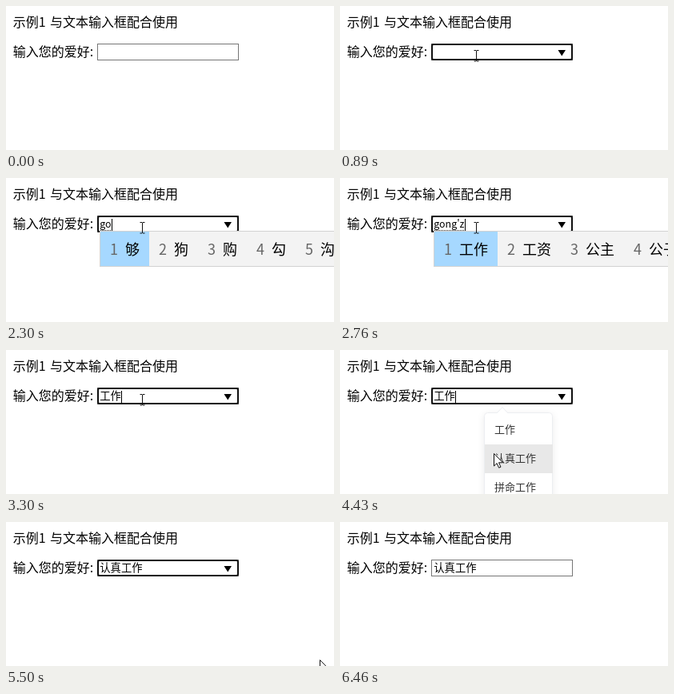
Animation of 410 by 180 pixels, one loop 6590 ms. Source, as an HTML page:

```html
<!DOCTYPE html>
<html lang="zh-CN">
<head>
<meta charset="utf-8">
<title>文本输入框</title>
<style>
  html, body { margin: 0; width: 100%; height: 100%; overflow: hidden; background: #fff; }
  svg { display: block; width: 410px; height: 180px; font: 16px "Noto Sans CJK SC", "Noto Sans CJK", sans-serif; }
  .small { font-size: 13.333px; }
  #menu { font-size: 13px; fill: #333; }
  #ime { font-size: 18px; }
  #ime .num { fill: #666; }
</style>
</head>
<body>
<svg viewBox="0 0 410 180">
  <text x="8.7" y="26">示例1</text>
  <text x="55" y="26">与文本输入框配合使用</text>
  <text x="8.7" y="63">输入您的爱好:</text>

  <rect id="border" x="114.5" y="47.5" width="176" height="20" fill="#fff" stroke="#767676"/>
  <rect id="ring" x="115" y="48" width="175" height="19" rx="2" fill="#fff" stroke="#101010" stroke-width="2"/>
  <path id="indicator" d="M272.5 55h9.5l-4.75 7.5z"/>
  <text id="value" class="small" x="117.3" y="62"></text>
  <path id="underline" fill="none" stroke="#333" stroke-dasharray="1 1"/>
  <rect id="caret" y="51" width="1" height="15"/>

  <g id="menu">
    <rect x="180.5" y="78.5" width="85" height="130" rx="4" fill="#fff" stroke="#eceef1"
      style="filter: drop-shadow(0 2px 4px rgba(0,0,0,.08))"/>
    <path d="M196 79l7-7.5 7 7.5" fill="#fff" stroke="#eceef1"/>
    <rect id="highlight" x="181" width="85" height="36" fill="#e8e8e8"/>
    <text x="193" y="103.5"></text>
    <text x="193" y="139.5"></text>
    <text x="193" y="175.5"></text>
  </g>

  <g id="ime">
    <rect x="117.5" y="66.5" width="300" height="44" fill="#f3f3f3" stroke="#d2d2d2"/>
    <rect id="chosen" x="118" y="67" height="43" fill="#a6d8ff"/>
    <g id="candidates"></g>
  </g>

  <path id="beam" d="M-3-7h2.5l.5.5.5-.5H3M0-6.5V6M-3 6.5h2.5L0 6l.5.5H3" fill="none" stroke="#111"/>
  <path id="arrow" d="M.5.5v15.5l3.6-3.4 2.5 5.6 2.4-1-2.5-5.4h5z" fill="#fff" stroke="#111"/>
</svg>
<script>
const LOOP = 6590;
const TEXT_LEFT = 117.3;
const $ = id => document.getElementById(id);
const show = (id, on) => $(id).setAttribute("visibility", on ? "visible" : "hidden");
const setText = (node, text) => { if (node.textContent !== text) node.textContent = text; };

// [start, text, input-method candidates]
const entries = [
  [0, ""],
  [2100, "g", "个 给 过 高 国"],
  [2300, "go", "够 狗 购 勾 沟"],
  [2500, "gon", "共 公 工 供 宫"],
  [2560, "gong", "工 公 共 供 宫"],
  [2760, "gong'z", "工作 工资 公主 公子"],
  [2890, "gong'zu", "工作 公租 公祖 公足"],
  [2950, "gong'zuo", "工作 公座 共做 工做"],
  [3300, "工作"],
  [4840, "认真工作"]
];
// [start, opacity]
const menuFade = [[0, 0], [960, .5], [1030, 1], [2170, .4], [2230, 0],
  [3370, 1], [4910, .6], [4970, .25], [5040, 0]];
// [start, caret visible]
const blinks = [[0, 0], [960, 1], [1500, 0], [2030, 1], [3830, 0], [4360, 1],
  [5330, 0], [5860, 1], [6390, 0]];
// [start, end, step, from, to, ease]
const moves = [
  [200, 760, 70, [334, 163], [170, 62], u => 1 - (1 - u) ** 2],
  [4230, 4430, 66.6, [172, 76], [192.5, 130], u => u],
  [4500, 4640, 70, [194, 131], [200, 136], u => u],
  [5240, 5500, 65, [212, 138], [392, 172], u => u]
];

const latest = (list, t) => list.findLast(item => item[0] <= t);

function pointer(t) {
  const move = latest(moves, t);
  if (!move || t >= 5570) return null;
  const [start, end, step, from, to, ease] = move;
  const elapsed = Math.floor((t - start) / step + .001) * step;
  const u = ease(Math.min(1, elapsed / (end - start)));
  return from.map((v, i) => v + (to[i] - v) * u);
}

let shownCandidates;
function drawCandidates(words) {
  show("ime", words);
  if (!words || words === shownCandidates) return;
  shownCandidates = words;
  const list = words.split(" ");
  const pitch = 43 + 18 * list[0].length;
  $("chosen").setAttribute("width", pitch);
  $("candidates").innerHTML = list.map((word, i) => {
    const x = 130 + i * pitch;
    return `<text class="num" x="${x}" y="95.5">${i + 1}</text><text x="${x + 19}" y="95.5">${word}</text>`;
  }).join("");
}

function draw(t) {
  const focused = t >= 890 && t < 6460;
  const at = pointer(t);
  const overInput = at && at[0] > 114 && at[0] < 291 && at[1] > 47 && at[1] < 68;
  show("ring", focused);
  show("indicator", focused || overInput);
  $("border").setAttribute("stroke", overInput ? "#4f4f4f" : "#767676");

  const [, text, words] = latest(entries, t);
  const value = $("value");
  setText(value, text);
  value.style.fontSize = words ? "12.4px" : "";
  const end = Math.ceil(TEXT_LEFT + (text ? value.getComputedTextLength() : 0));
  $("underline").setAttribute("d", words ? `M118 65.5H${end}` : "");
  $("caret").setAttribute("x", end);
  show("caret", latest(blinks, t)[1]);
  drawCandidates(words);

  $("menu").setAttribute("opacity", latest(menuFade, t)[1]);
  const items = t < 3000 ? ["抽烟", "喝酒", "烫头"] : ["工作", "认真工作", "拼命工作"];
  $("menu").querySelectorAll("text").forEach((node, i) => setText(node, items[i]));
  const row = at ? Math.floor((at[1] - 82) / 36) : -1;
  const hovering = t >= 4230 && t < 5240 && row >= 0;
  show("highlight", hovering);
  if (hovering) $("highlight").setAttribute("y", 82 + 36 * row);

  show("beam", overInput);
  show("arrow", at && !overInput);
  if (at) {
    const [x, y] = at.map(Math.floor);
    $("beam").setAttribute("transform", `translate(${x + .5} ${y + .5})`);
    $("arrow").setAttribute("transform", `translate(${x} ${y})`);
  }
}

const begin = performance.now();
function tick() {
  draw((performance.now() - begin) % LOOP);
  requestAnimationFrame(tick);
}
tick();
</script>
</body>
</html>
```
